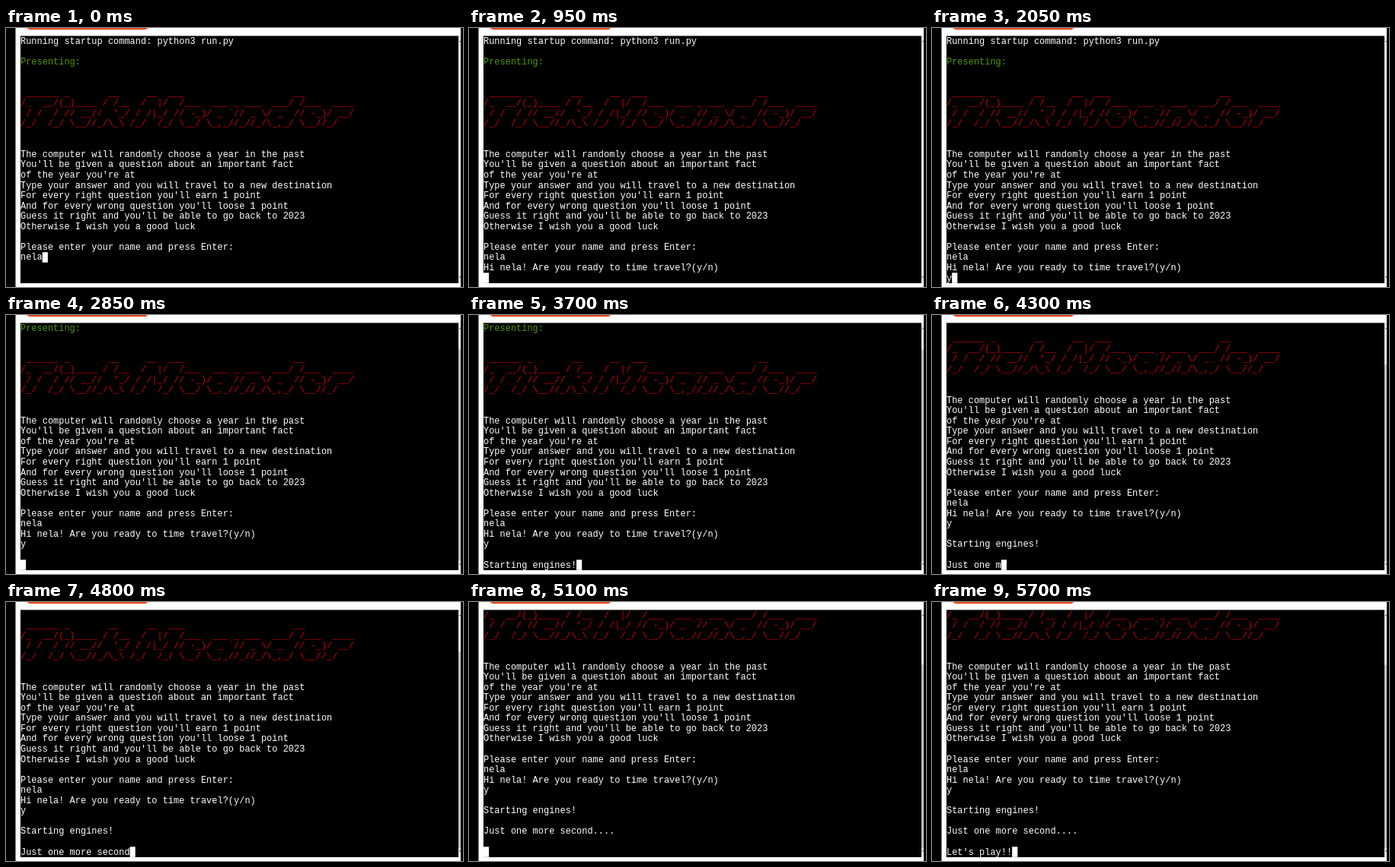
An HTML page with a canvas for the animation above (8000 ms loop, 600 px wide and 341 px high).

```html
<!DOCTYPE html>
<html lang="en">
<head>
<meta charset="utf-8">
<title>Terminal game intro</title>
<style>
html, body { margin: 0; width: 100%; height: 100%; overflow: hidden; background: #fff; }
canvas { display: block; }
</style>
</head>
<body>
<canvas id="stage" width="600" height="341"></canvas>
<script>
const ctx = document.getElementById('stage').getContext('2d');

const LOOP = 8000, TICK = 50;
const ROWS = 24, LEFT = 19, TOP = 10.4, RIGHT = 594, BOTTOM = 336;
const CELL_W = 7.18, CELL_H = 13.56, BASELINE = 10.3;
const WHITE = '#fff', GREEN = '#4e9a06', RED = '#cc0000';
const TITLE_ROW = 5;

const player = 'nela';

const title = [
  " ______ _       __     __  ___                    __",
  "/_  __/(_)____ / /__  /  |/  /___  ___ _ ___  ___/ /___  ____",
  " / /  / // __//  '_/ / /|_/ // -_)/ _ `// _ \\/ _  // -_)/ __/",
  "/_/  /_/ \\__//_/\\_\\ /_/  /_/ \\__/ \\_,_//_//_/\\_,_/ \\__//_/"
];

const intro = [
  'Running startup command: python3 run.py', '',
  'Presenting:', '', '',
  ...title, '', '',
  'The computer will randomly choose a year in the past',
  "You'll be given a question about an important fact",
  "of the year you're at",
  'Type your answer and you will travel to a new destination',
  "For every right question you'll earn 1 point",
  "And for every wrong question you'll loose 1 point",
  "Guess it right and you'll be able to go back to 2023",
  'Otherwise I wish you a good luck', '',
  'Please enter your name and press Enter:',
  player
].join('\n');

const greeting = `\nHi ${player}! Are you ready to time travel?(y/n)\n`;

// Typed one character per tick, line breaks included.
const typed = "Starting engines!\n\nJust one more second....\n\nLet's play!!";

function output(t) {
  let text = intro;
  if (t >= 900) text += greeting;
  if (t >= 2000) text += 'y';
  if (t >= 2850) text += '\n\n' + typed.slice(0, Math.floor((t - 2850) / TICK));
  return text.split('\n');
}

function rect(color, x, y, w, h) {
  ctx.fillStyle = color;
  ctx.fillRect(x, y, w, h);
}

function lineColor(i) {
  if (i === 2) return GREEN;
  return i >= TITLE_ROW && i < TITLE_ROW + title.length ? RED : WHITE;
}

function drawPage() {
  rect('#000', 0, 0, 600, 341);
  rect('#fff', 12.5, 0, 584.5, 341);
  ctx.fillStyle = '#e84620';
  ctx.beginPath();
  ctx.roundRect(27, -20, 160, 22.3, 5);
  ctx.fill();
  rect('#000', LEFT, TOP, RIGHT - LEFT, BOTTOM - TOP);
}

function drawScrollbar(total) {
  const top = 22, height = 302;
  rect('#f1f1f1', RIGHT, TOP, 3, BOTTOM - TOP);
  rect('#777', RIGHT + 1, 17, 2, 1.5);
  rect('#777', RIGHT + 1, 327, 2, 1.5);
  if (total > ROWS) {
    const thumb = height * ROWS / total;
    rect('#c1c1c1', RIGHT, top + height - thumb, 3, thumb);
  }
}

function drawTerminal(lines) {
  const scroll = Math.max(0, lines.length - ROWS);
  ctx.font = '11.97px "Liberation Mono", "Courier New", monospace';
  ctx.textBaseline = 'alphabetic';
  for (let i = scroll; i < lines.length; i++) {
    const y = TOP + (i - scroll) * CELL_H + BASELINE;
    ctx.fillStyle = lineColor(i);
    [...lines[i]].forEach((ch, col) => {
      if (ch !== ' ') ctx.fillText(ch, LEFT + col * CELL_W, y);
    });
  }
  const last = lines.length - 1;
  rect(WHITE, LEFT + lines[last].length * CELL_W, TOP + (last - scroll) * CELL_H, CELL_W, CELL_H);
}

function frame(now) {
  const lines = output(now % LOOP);
  drawPage();
  drawScrollbar(lines.length);
  drawTerminal(lines);
  requestAnimationFrame(frame);
}
requestAnimationFrame(frame);
</script>
</body>
</html>
```
